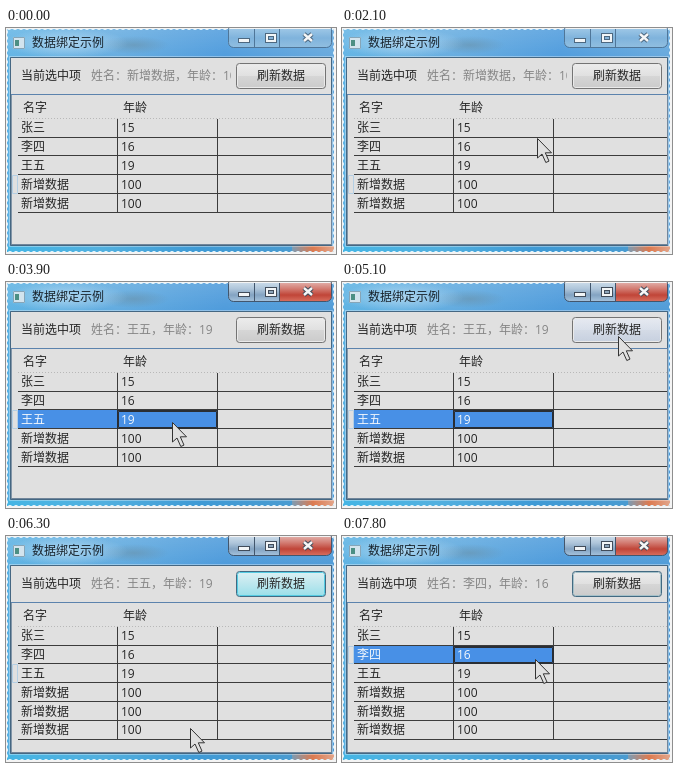
Recreate the animation shown at these times as an HTML page with a canvas. Size 330 by 226 pixels, loop 8 s.

```html
<!DOCTYPE html>
<html lang="zh-CN">
<head>
<meta charset="utf-8">
<style>
html, body { margin: 0; width: 100%; height: 100%; overflow: hidden; background: #f4f4f4; }
canvas { display: block; }
</style>
</head>
<body>
<canvas id="stage" width="330" height="226"></canvas>
<script>
const ctx = document.getElementById('stage').getContext('2d');
const LOOP = 8000;
const FONT = '12px "Open Sans", "Noto Sans CJK SC", "Noto Sans CJK", sans-serif';
// Traditional face: full-width punctuation sits in the middle of its cell
const CENTRED_FONT = '12px "Open Sans", "Noto Sans CJK TC", "Noto Sans CJK", sans-serif';
const ROWS = [['张三', 15], ['李四', 16], ['王五', 19], ['新增数据', 100], ['新增数据', 100], ['新增数据', 100]];

// [start ms, x, y] of the pointer tip
const POINTER = [
  [900, 295, 118], [1200, 206, 110], [1500, 195, 110], [1800, 203, 112], [2100, 195, 110],
  [2400, 190, 110], [2700, 190, 112], [3000, 184, 123], [3600, 170, 138], [3900, 166, 140],
  [4200, 168, 140], [4500, 233, 106], [4800, 263, 74], [5100, 276, 54], [5700, 232, 140],
  [6000, 189, 188], [6300, 184, 192], [6600, 185, 175], [6900, 186, 160], [7200, 188, 153],
  [7500, 192, 125], [7800, 193, 123]
];
// [start ms, current row, cells filled]; the label keeps its own row
const SELECTION = [
  [0, 3, false], [2400, 0, true], [3300, 1, true], [3900, 2, true],
  [5400, 2, false], [6600, 5, true], [7200, 3, true], [7800, 1, true]
];
// [start ms, default outline, glow 0..1, glow colours]
const HOVER = ['#e3e9f4', '#d3def1', '#c3d3ec'];
const CYAN = ['#dcf0f3', '#bde7ee', '#9adfe9'];
const BUTTON = [
  [0, false, 0], [5100, false, 0.6, HOVER], [5400, true, 0.75, CYAN], [5700, true, 0.55, CYAN],
  [6000, true, 0.75, CYAN], [6300, true, 1, CYAN], [6600, true, 0.5, CYAN], [6900, true, 0]
];

const at = (track, t) => track.filter(k => k[0] <= t).pop();
const lineY = k => Math.floor(90.3 + 18.8 * k);

function rect(x, y, w, h, fill) {
  ctx.fillStyle = fill;
  ctx.fillRect(x, y, w, h);
}

function frame(x, y, w, h, color, r = 0) {
  ctx.strokeStyle = color;
  ctx.lineWidth = 1;
  ctx.beginPath();
  ctx.roundRect(x + 0.5, y + 0.5, w - 1, h - 1, r);
  ctx.stroke();
}

function text(s, x, y, color = '#262626') {
  ctx.fillStyle = color;
  ctx.fillText(s, x, y);
}

function gradient(x0, y0, x1, y1, ...colors) {
  const g = ctx.createLinearGradient(x0, y0, x1, y1);
  colors.forEach((c, i) => g.addColorStop(i / (colors.length - 1), c));
  return g;
}

function glow(x, y, rx, ry, rgb, alpha) {
  ctx.save();
  ctx.translate(x, y);
  ctx.scale(rx, ry);
  const g = ctx.createRadialGradient(0, 0, 0, 0, 0, 1);
  g.addColorStop(0, `rgba(${rgb},${alpha})`);
  g.addColorStop(1, `rgba(${rgb},0)`);
  ctx.fillStyle = g;
  ctx.fillRect(-1, -1, 2, 2);
  ctx.restore();
}

function captionButtons(active) {
  const edge = active ? '#42566d' : '#4f7699';
  const body = active
    ? gradient(0, 1, 0, 19, '#c8d9e8', '#aec5da', '#83a3c2', '#a3c0da')
    : gradient(0, 1, 0, 19, '#9cc6e6', '#7fb3dc', '#90bee0');
  const close = active ? gradient(0, 1, 0, 19, '#e0aaa4', '#d27a70', '#c04538', '#d66c5c') : body;
  ctx.save();
  ctx.beginPath();
  ctx.roundRect(222, 0, 104, 19, [0, 0, 5, 5]);
  ctx.clip();
  rect(222, 1, 51, 18, body);
  rect(273, 1, 53, 18, close);
  rect(248, 1, 1, 18, edge);
  rect(273, 1, 1, 18, edge);
  ctx.restore();
  frame(222, -4, 104, 24, edge, 5);

  const ink = active ? '#414c5a' : '#4d6880';
  rect(232, 10, 12, 5, ink);
  rect(233, 11, 10, 3, '#f2f5f7');
  rect(259, 5, 12, 10, ink);
  rect(260, 6, 10, 8, '#f2f5f7');
  rect(262, 8, 6, 4, ink);
  rect(263, 9, 4, 2, active ? '#8da5bb' : '#86b3d8');
  for (const [color, width] of [[ink, 4.5], ['#f5f6f7', 2.4]]) {
    ctx.strokeStyle = color;
    ctx.lineWidth = width;
    ctx.beginPath();
    ctx.moveTo(298, 6); ctx.lineTo(306, 13);
    ctx.moveTo(306, 6); ctx.lineTo(298, 13);
    ctx.stroke();
  }
}

function windowFrame(active) {
  rect(0, 0, 330, 226, '#f4f4f4');
  rect(1, 1, 327, 223, active
    ? gradient(0, 0, 328, 0, '#58b0e2', '#5ca8de', '#4797da', '#4a98d6')
    : gradient(0, 0, 328, 0, '#5eb2e4', '#62aadf', '#4a99dc', '#62a6dc'));
  rect(1, 1, 327, 28, gradient(0, 1, 0, 29, 'rgba(255,255,255,.16)', 'rgba(255,255,255,.04)'));
  glow(128, 17, 35, 9, '105,145,170', 0.6);
  glow(60, 15, 62, 15, '215,235,248', 0.6);
  rect(1, 218, 327, 6, gradient(1, 0, 288, 0, '#45b5e4', '#52b0df', '#3f9ad5', '#4a9bd0'));
  rect(286, 218, 42, 6, gradient(286, 0, 328, 0, '#7c9cb4', '#dc7a50', '#e2a58a'));

  ctx.setLineDash([3, 3]);
  frame(1, 1, 327, 223, '#dcf1fb');
  ctx.setLineDash([]);

  rect(7, 9, 12, 12, '#d3e4ee');
  frame(7, 9, 12, 12, '#86a5b8');
  rect(9, 12, 4, 6, '#4c8f84');
  text('数据绑定示例', 26, 19, '#17222b');
  captionButtons(active);

  frame(3, 28, 324, 191, 'rgba(255,255,255,.35)');
  rect(5, 30, 321, 187, '#e0e0e0');
  frame(4, 29, 322, 189, '#456782');
}

function refreshButton([, outlined, level, colors]) {
  ctx.beginPath();
  ctx.roundRect(230.5, 35.5, 89, 25, 3);
  const g = ctx.createLinearGradient(0, 36, 0, 60);
  [[0, '#ececec'], [0.5, '#e0e0e0'], [0.5, '#d6d6d6'], [1, '#cbcbcb']].forEach(s => g.addColorStop(...s));
  ctx.fillStyle = g;
  ctx.fill();
  if (level) {
    ctx.globalAlpha = level;
    ctx.fillStyle = gradient(0, 36, 0, 60, ...colors);
    ctx.fill();
    ctx.globalAlpha = 1;
  }
  frame(231, 36, 88, 24, outlined ? (level ? '#55cbe2' : '#a5c0c8') : '#eaeaea', 2);
  frame(230, 35, 90, 26, outlined ? '#426a82' : '#747474', 3);
  text('刷新数据', 251, 52);
}

function grid([, row, filled], count) {
  rect(5, 66, 321, 1, '#5c83ad');
  rect(5, 67, 1, 150, '#8396a8');
  rect(325, 67, 1, 150, '#71869b');
  rect(5, 216, 321, 1, '#71869b');
  text('名字', 17, 84);
  text('年龄', 117, 84);
  for (let x = 12; x < 325; x += 3) rect(x, 90, 1, 1, '#b8b8b8');

  const top = lineY(row), height = lineY(row + 1) - top;
  frame(6, top + 1, 6, height, '#b4cfe4');
  if (filled) rect(12, top + 1, 200, height, '#4890e6');

  for (let i = 0; i < count; i++) {
    const y = lineY(i), bottom = lineY(i + 1);
    const base = Math.round(104.4 + 18.8 * i);
    const color = filled && i === row ? '#f4f8fc' : '#262626';
    rect(12, bottom, 313, 1, '#3c3c3c');
    rect(111, y + 1, 1, bottom - y, '#3c3c3c');
    rect(211, y + 1, 1, bottom - y, '#3c3c3c');
    text(ROWS[i][0], 15, base, color);
    text(ROWS[i][1], 115, base, color);
  }
  if (filled) {
    frame(111, top + 1, 101, height, '#2a2e34');
    frame(112, top + 2, 99, height - 2, '#2a2e34');
  }
}

function currentItem(row) {
  text('当前选中项', 15, 52);
  ctx.save();
  ctx.beginPath();
  ctx.rect(80, 36, 145, 26);
  ctx.clip();
  ctx.font = CENTRED_FONT;
  text(`姓名：${ROWS[row][0]}，年龄：${ROWS[row][1]}`, 85, 52, '#858585');
  ctx.restore();
}

function pointer(x, y) {
  ctx.save();
  ctx.translate(x + 0.5, y + 0.5);
  ctx.beginPath();
  [[0, 0], [0, 19.5], [4.5, 15.5], [8.3, 24], [11.5, 22.6], [7.8, 14.3], [14, 14.3]]
    .forEach(p => ctx.lineTo(...p));
  ctx.closePath();
  ctx.fillStyle = '#e0e0e0';
  ctx.fill();
  ctx.strokeStyle = '#333';
  ctx.lineWidth = 1;
  ctx.stroke();
  ctx.restore();
}

function draw(now) {
  const t = now % LOOP;
  const selection = at(SELECTION, t);
  const tip = at(POINTER, t);
  ctx.font = FONT;
  windowFrame(t >= 2400);
  currentItem(selection[1]);
  refreshButton(at(BUTTON, t));
  grid(selection, t < 5400 ? 5 : 6);
  if (tip) pointer(tip[1], tip[2]);
}

const start = performance.now();
function tick() {
  draw(performance.now() - start);
  requestAnimationFrame(tick);
}
tick();
</script>
</body>
</html>
```
